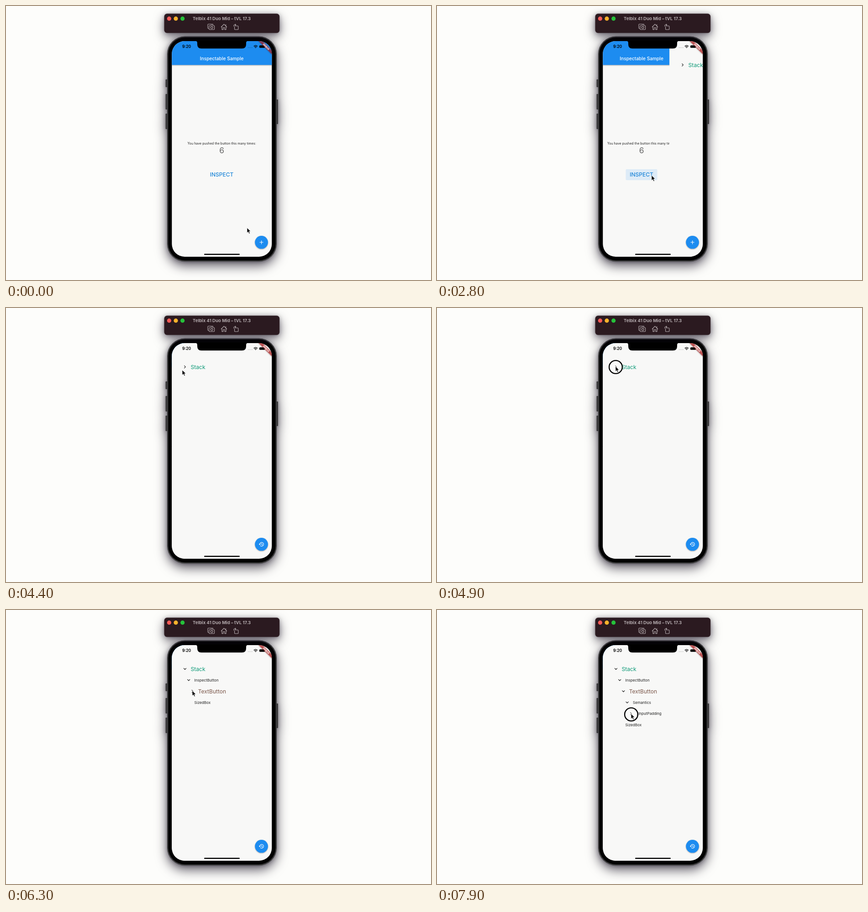
Recreate the animation shown at these times as an HTML page. Size 931 by 601 pixels, loop 8 s.

```html
<!DOCTYPE html>
<html lang="en">
<head>
<meta charset="utf-8">
<title>Widget inspector</title>
<style>
  html, body { margin: 0; width: 100%; height: 100%; overflow: hidden; background: #fdfdfb; }
  svg { display: block; font-family: Inter, "Open Sans", sans-serif; }
  .line { fill: none; stroke-linecap: round; stroke-linejoin: round; }
  .phone { filter: drop-shadow(0 1px 4px rgba(20, 14, 30, .35)) drop-shadow(0 9px 12px rgba(20, 14, 30, .65)); }
  .bar { filter: drop-shadow(0 1px 4px rgba(20, 14, 30, .25)) drop-shadow(0 8px 11px rgba(20, 14, 30, .6)); }
  .low { filter: drop-shadow(0 1.2px 1.2px rgba(0, 0, 0, .32)); }
  .mid { text-anchor: middle; }
</style>
</head>
<body>
<svg width="931" height="601" viewBox="0 0 931 601">
  <defs>
    <clipPath id="screen"><rect x="363.3" y="77" width="219" height="473" rx="28"/></clipPath>
  </defs>

  <g class="phone">
    <g fill="#3b3a3c">
      <rect x="349.5" y="161" width="6" height="17" rx="1.3"/>
      <rect x="349.5" y="193" width="6" height="34" rx="1.3"/>
      <rect x="349.5" y="236" width="6" height="34" rx="1.3"/>
      <rect x="590" y="205" width="6" height="54" rx="1.3"/>
    </g>
    <rect x="353" y="66.5" width="240" height="494" rx="39" fill="#2b2b2c"/>
    <rect x="354" y="67.5" width="238" height="492" rx="38" fill="none" stroke="#555" stroke-width=".8"/>
    <rect x="355.6" y="69.1" width="234.8" height="488.8" rx="36.5" fill="#000"/>
  </g>

  <g class="bar">
    <rect x="346.8" y="17" width="252.2" height="42" rx="6" fill="#2b1a20" stroke="#47383d" stroke-width=".7"/>
  </g>
  <circle cx="357.4" cy="27.7" r="4.6" fill="#fc5b57"/>
  <circle cx="372" cy="27.7" r="4.6" fill="#fdb32b"/>
  <circle cx="386.7" cy="27.7" r="4.6" fill="#25c23a"/>
  <text class="mid" x="472.6" y="31" font-size="9.6" font-weight="700" fill="#b2a9ac">Telbix 41 Duo Mid – tVL 17.3</text>
  <g class="line" stroke="#b4abae" stroke-width="1.1">
    <path d="M444 49.2H443Q442 49.2 442 48V41Q442 39.8 443.2 39.8H452.5Q453.7 39.8 453.7 41"/>
    <path d="M446 43H448.3L449.3 41.8H452.4L453.4 43H455.5Q456.6 43 456.6 44.1V50.6Q456.6 51.7 455.5 51.7H446Q444.9 51.7 444.9 50.6V44.1Q444.9 43 446 43Z"/>
    <circle cx="450.8" cy="47.3" r="2.4"/>
    <path d="M471.2 46.2L477.5 40L483.8 46.2M473 45V51.6H475.9V47.2H479.1V51.6H482V45M481.6 43.5V40.8"/>
    <path d="M502.2 43.7H507.7Q508.8 43.7 508.8 44.8V50.7Q508.8 51.8 507.7 51.8H501.7Q500.6 51.8 500.6 50.7V45.3M499 44.5V43Q499 41.3 500.8 41.3H503.5M502 39.6L503.7 41.3L502 43"/>
  </g>

  <g clip-path="url(#screen)">
    <g id="home">
      <rect x="363" y="77" width="220" height="474" fill="#f8f8f7"/>
      <rect class="low" x="363" y="70" width="220" height="59.3" fill="#1d8cf0"/>
      <text class="mid" x="472.6" y="118.5" font-size="10.2" font-weight="500" fill="#fff">Inspectable Sample</text>
      <text class="mid" x="472.6" y="304" font-size="7.1" fill="#222">You have pushed the button this many times:</text>
      <text class="mid" x="472.6" y="322.6" font-size="17.4" fill="#666">6</text>
      <rect id="ink" x="438" y="358" width="69" height="24" rx="2" fill="#1d8cf0"/>
      <text class="mid" x="472.6" y="374.4" font-size="12" font-weight="500" fill="#1d86d8">INSPECT</text>
    </g>
    <g id="inspector">
      <rect x="363" y="77" width="220" height="474" fill="#f8f8f7"/>
      <g id="tree"></g>
    </g>

    <circle class="low" cx="559.6" cy="518.3" r="14.3" fill="#1d8cf0"/>
    <path id="plus" class="line" stroke="#fff" stroke-width="1.1" d="M556 518.3H563.2M559.6 514.7V521.9"/>
    <g id="history" class="line" stroke="#fff" stroke-width="1.1">
      <path d="M556 518.3A4.2 4.2 0 1 1 557.3 521.3M560.2 516V518.6L562.1 519.7"/>
      <path d="M554.3 517.8H557.7L556 519.7Z" fill="#fff" stroke-width=".4"/>
    </g>

    <text x="386" y="92.2" font-size="8.6" font-weight="600">9:20</text>
    <path d="M530 91.3H540" stroke="#000" stroke-opacity=".3" stroke-width="1.2" stroke-dasharray="1.2 1.6"/>
    <g class="line" stroke="#000" stroke-width="1.3">
      <path d="M543.2 88Q546.8 84.8 550.4 88M544.8 89.8Q546.8 88 548.8 89.8"/>
    </g>
    <circle cx="546.8" cy="91.3" r=".9"/>
    <rect x="555" y="86.2" width="12" height="5.6" rx="1.5"/>
    <g transform="translate(582.3 77) rotate(45)">
      <rect class="low" x="-21" y="14.3" width="42" height="6.2" fill="#b71c1c" fill-opacity=".68"/>
      <text class="mid" y="19.3" font-size="5.1" font-weight="800" fill="#fff">DEBUG</text>
    </g>
    <rect x="434" y="543.5" width="78" height="2.5" rx="1.25"/>
  </g>
  <path d="M415 76.5Q419 77 419 81V84Q419 93.3 428 93.3H517Q526 93.3 526 84V81Q526 77 530 76.5Z"/>

  <g id="pointer">
    <circle id="press" cx=".5" cy="1.5" r="14.4" fill="#fff" fill-opacity=".3" stroke="#000" stroke-width="2.4"/>
    <path d="M0 0V11.2L2.6 8.8L4.5 13L6.4 12.2L4.6 8H8Z" stroke="#fff" stroke-width=".8" stroke-linejoin="round"/>
  </g>
</svg>

<script>
const LOOP = 8000, ROW = 24.5, OPEN_MS = 200, SLIDE_MS = 400, SLIDE_AT = 2750;
const $ = id => document.getElementById(id);
const clamp = v => Math.max(0, Math.min(1, v));
const smooth = v => v * v * (3 - 2 * v);
const easeOut = v => 1 - (1 - v) ** 3;

// Pointer stops: time, x, y
const stops = [
  [0, 528, 486.5], [750, 528, 486.5], [1200, 490, 446], [1350, 490, 446],
  [1750, 463, 415], [1850, 463, 415], [2200, 470, 371.5], [3700, 470, 371.5],
  [4350, 386, 136], [4450, 386, 136], [4650, 391, 128], [4950, 391, 128],
  [5300, 400, 149], [5850, 400, 149], [6300, 408, 177], [6650, 408, 177],
  [7000, 418, 203.5], [7250, 418, 203.5], [7650, 425, 227.5], [LOOP, 425, 227.5]
];
const presses = [[2450, 2700], [4750, 4950], [5500, 5700], [6400, 6600], [7050, 7200], [7800, LOOP]];
const openings = [4950, 5700, 6600, 7200];

const rows = [
  { name: "Stack", depth: 0, size: 12.2, color: "#0f9a78" },
  { name: "InspectButton", depth: 1 },
  { name: "TextButton", depth: 2, size: 12, color: "#795548" },
  { name: "Semantics", depth: 3 },
  { name: "_InputPadding", depth: 4 },
  { name: "SizedBox", depth: 1, leaf: true }
];

$("tree").innerHTML = rows.map(({ name, depth, size = 8.1, color = "#222", leaf }) => {
  const x = 392 + depth * 8.2;
  const arrow = leaf ? "" : `<path class="line" stroke="#222" stroke-width="1.2" d="M-1.3 -2.6L1.3 0L-1.3 2.6"/>`;
  return `<g><g transform="translate(${x} 0)">${arrow}</g>
    <text x="${x + 12.4}" y="${size * 0.36}" font-size="${size}" fill="${color}">${name}</text></g>`;
}).join("");
const rowNodes = [...$("tree").children];

function pointerAt(t) {
  const i = stops.findIndex(s => s[0] > t);
  const [t0, x0, y0] = stops[i - 1], [t1, x1, y1] = stops[i];
  const k = smooth((t - t0) / (t1 - t0));
  return [x0 + (x1 - x0) * k, y0 + (y1 - y0) * k];
}

function drawTree(t) {
  const open = openings.map(at => easeOut(clamp((t - at) / OPEN_MS)));
  const total = open.reduce((a, b) => a + b);
  let level = 0;
  rowNodes.forEach((node, i) => {
    const { leaf } = rows[i];
    if (i && !leaf) level += open[i - 1];
    const y = 129.2 + ROW * (leaf ? total + open[0] : level);
    node.setAttribute("transform", `translate(0 ${y})`);
    node.setAttribute("opacity", leaf ? open[0] : i ? open[i - 1] : 1);
    const arrow = node.querySelector("path");
    if (arrow) arrow.setAttribute("transform", `rotate(${90 * (open[i] || 0)})`);
  });
}

function draw() {
  const t = performance.now() % LOOP;
  const slide = easeOut(clamp((t - SLIDE_AT) / SLIDE_MS));
  $("home").setAttribute("transform", `translate(${-73 * slide} 0)`);
  $("inspector").setAttribute("transform", `translate(${220 * (1 - slide)} 0)`);
  $("plus").setAttribute("opacity", slide < 0.5 ? 1 : 0);
  $("history").setAttribute("opacity", slide < 0.5 ? 0 : 1);
  $("ink").setAttribute("opacity", t > 2500 && t < 2900 ? 0.12 : 0);
  drawTree(t);
  $("pointer").setAttribute("transform", `translate(${pointerAt(t)})`);
  $("press").setAttribute("opacity", presses.some(([a, b]) => t >= a && t < b) ? 1 : 0);
  requestAnimationFrame(draw);
}
draw();
</script>
</body>
</html>
```
